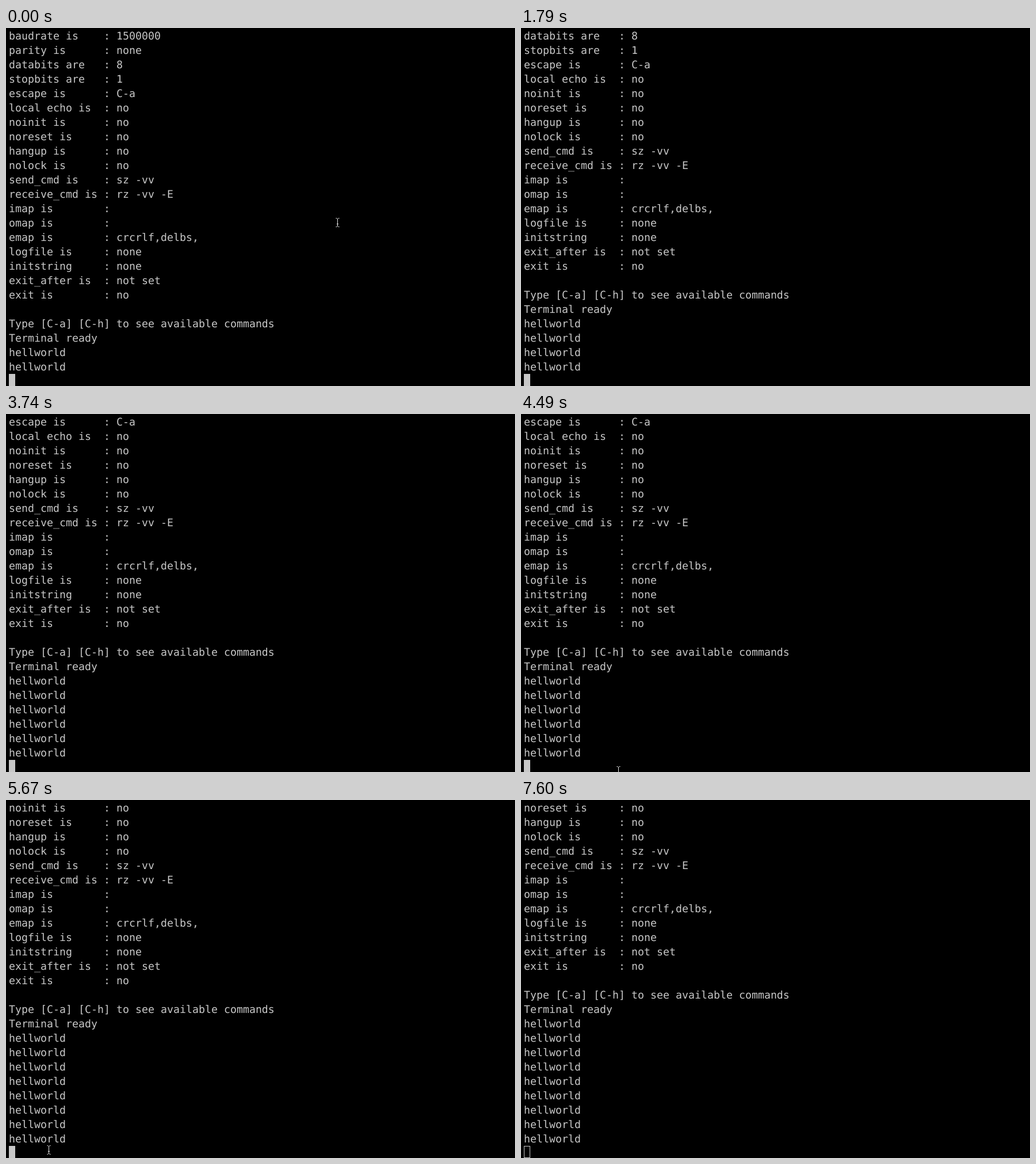
An HTML page for the animation above (7.7 s loop, 885 px wide and 622 px high).

```html
<!DOCTYPE html>
<html lang="en">
<head>
<meta charset="utf-8">
<title>Serial terminal</title>
<style>
html, body { margin: 0; width: 100%; height: 100%; overflow: hidden; background: #000; }
svg { display: block; width: 885px; height: 622px; }
text {
  font: 18.27px "DejaVu Sans Mono", monospace;
  fill: #c7c7c7;
  white-space: pre;
  text-rendering: geometricPrecision;
}
</style>
</head>
<body>
<svg viewBox="0 0 885 622">
  <rect width="885" height="622"/>
  <g id="screen"></g>
  <rect id="block" x="5" y="601" width="11" height="21" fill="#c7c7c7"/>
  <rect id="hollow" x="5.5" y="601.5" width="10" height="20" fill="none" stroke="#c7c7c7"/>
  <path id="pointer" fill="none" stroke="#e4e4e4" d="M.5 .5H2L3.5 2L5 .5H6.5M3.5 2V14M.5 15.5H2L3.5 14L5 15.5H6.5M2 10.5H5"/>
</svg>
<script>
const LOOP = 7700, ROWS = 24, LINE = 25;
const BLUR_AT = 7600;
const SCROLLS = [740, 1790, 2690, 3740, 4640, 5670, 6720];

// [time, x, y]; no position means hidden
const POINTER = [
  [0, 573, 330], [1340, 670, 389], [1490],
  [4490, 166, 612], [4790, 111, 607], [4930, 75, 601],
  [5080, 71, 600], [6120, 206, 603], [6270]
];

const SETTINGS = [
  ["baudrate is", "1500000"], ["parity is", "none"], ["databits are", "8"],
  ["stopbits are", "1"], ["escape is", "C-a"], ["local echo is", "no"],
  ["noinit is", "no"], ["noreset is", "no"], ["hangup is", "no"],
  ["nolock is", "no"], ["send_cmd is", "sz -vv"], ["receive_cmd is", "rz -vv -E"],
  ["imap is", ""], ["omap is", ""], ["emap is", "crcrlf,delbs,"],
  ["logfile is", "none"], ["initstring", "none"], ["exit_after is", "not set"],
  ["exit is", "no"]
];
const lines = [
  ...SETTINGS.map(([key, value]) => key.padEnd(15) + ": " + value),
  "",
  "Type [C-a] [C-h] to see available commands",
  "Terminal ready",
  ...Array(2 + SCROLLS.length).fill("hellworld")
];

const byId = id => document.getElementById(id);
const show = (el, on) => el.setAttribute("visibility", on ? "visible" : "hidden");
const block = byId("block"), hollow = byId("hollow"), pointer = byId("pointer");

const rows = Array.from({ length: ROWS }, (_, i) => {
  const row = document.createElementNS("http://www.w3.org/2000/svg", "text");
  row.setAttribute("x", 5);
  row.setAttribute("y", 19.5 + i * LINE);
  return byId("screen").appendChild(row);
});

let first = -1;

function draw(t) {
  const offset = SCROLLS.filter(s => t >= s).length;
  if (offset !== first) {
    first = offset;
    rows.forEach((row, i) => { row.textContent = lines[first + i]; });
  }
  const [, x, y] = POINTER.filter(p => t >= p[0]).pop();
  show(pointer, x !== undefined);
  if (x !== undefined) pointer.setAttribute("transform", `translate(${x} ${y})`);
  show(block, t < BLUR_AT);
  show(hollow, t >= BLUR_AT);
}

const start = performance.now();
function tick() {
  draw((performance.now() - start) % LOOP);
  requestAnimationFrame(tick);
}
tick();
</script>
</body>
</html>
```
